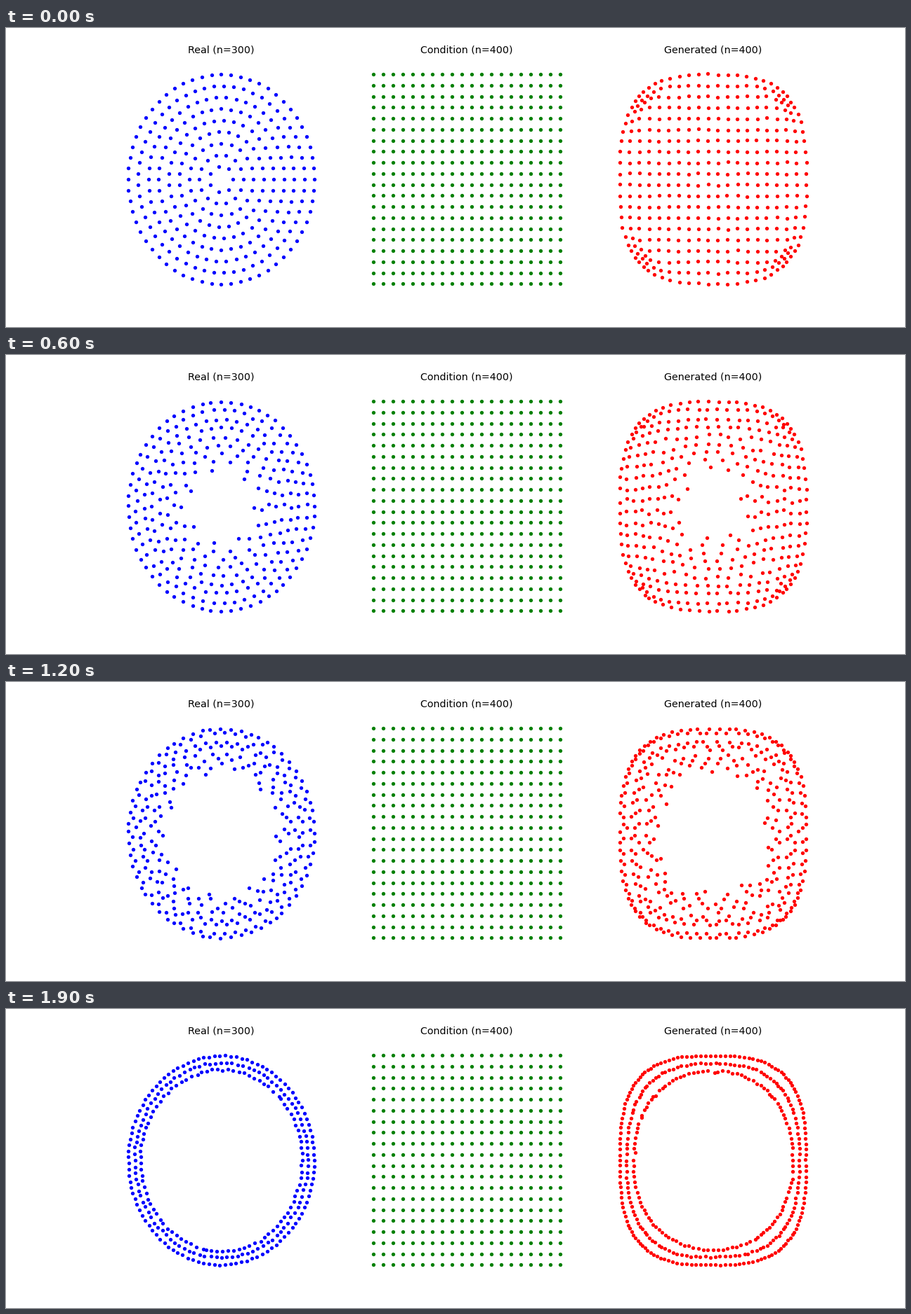
These frames come from a looping animation (1280 px wide and 427 px high, 2 s). A matplotlib script:

```python
import numpy as np
import matplotlib.pyplot as plt
from matplotlib.animation import FuncAnimation

W, H, DPI = 1280, 427, 64
FRAMES, STEP_MS = 20, 100
RADIUS = np.array([132.8, 149.6])
CENTERS = {"real": (306.4, 216), "cond": (656.2, 215.8), "gen": (1006.4, 216)}
CORNER_POWER = 2.95
rng = np.random.default_rng(4)


def edge(angle, power):
    """Polar radius of the unit superellipse."""
    c, s = np.abs(np.cos(angle)), np.abs(np.sin(angle))
    return (c ** power + s ** power) ** (-1 / power)


def ring(radius, count, power=2, crowd=0):
    """Evenly spread points on a ring, denser near the corners if crowded."""
    a = 2 * np.pi * np.arange(count) / count
    a = a + crowd / 4 * np.sin(4 * a)
    r = radius * edge(a, power)
    return np.column_stack([r * np.cos(a), -r * np.sin(a)])


def round_corners(points, core=0.9):
    """Squeeze the outer part of the square into a rounded shape."""
    a = np.arctan2(points[:, 1], points[:, 0])
    r = np.hypot(points[:, 0], points[:, 1])
    rim = edge(a, CORNER_POWER)
    square = 1 / np.maximum(np.abs(np.cos(a)), np.abs(np.sin(a)))
    inner = core * rim
    squeezed = inner + (r - inner) * (rim - inner) / (square - inner)
    r = np.where(r > inner, squeezed, r)
    return np.column_stack([r * np.cos(a), r * np.sin(a)])


def assign(cost):
    """Minimum-cost one-to-one assignment (Hungarian method)."""
    n = len(cost)
    u, v = np.zeros(n + 1), np.zeros(n + 1)
    owner, way = np.zeros(n + 1, int), np.zeros(n + 1, int)
    for row in range(1, n + 1):
        owner[0], j = row, 0
        best = np.full(n + 1, np.inf)
        used = np.zeros(n + 1, bool)
        while True:
            used[j] = True
            i = owner[j]
            reduced = cost[i - 1] - u[i] - v[1:]
            free = ~used[1:]
            better = free & (reduced < best[1:])
            best[1:][better] = reduced[better]
            way[1:][better] = j
            nxt = 1 + int(np.argmin(np.where(free, best[1:], np.inf)))
            delta = best[nxt]
            u[owner[used]] += delta
            v[used] -= delta
            best[~used] -= delta
            j = nxt
            if owner[j] == 0:
                break
        while j:
            prev = way[j]
            owner[j] = owner[prev]
            j = prev
    match = np.empty(n, int)
    match[owner[1:] - 1] = np.arange(n)
    return match


def squared_distance(a, b):
    return ((a[:, None] - b[None]) ** 2).sum(axis=2)


def pair(start, end, center, guides):
    """Match start to end points; guides pin the paths around the hole."""
    end = end.copy()
    guides = np.array(guides, float).reshape(-1, 2, 2)
    guides = (guides + 0.5 - center) / RADIUS
    pins = []
    for origin, goal in guides:
        i = np.argmin(((start - origin) ** 2).sum(axis=1))
        j = np.argmin(((end - goal) ** 2).sum(axis=1))
        end[j] = goal
        pins.append((i, j))
    cost = squared_distance(start, end)
    for i, j in pins:
        cost[i, j] -= 50
    return start * RADIUS + center, end[assign(cost)] * RADIUS + center


def jitter(points, amount):
    return points + rng.uniform(-amount, amount, points.shape)


# Disc of nine rings opening into three rings
disc_counts = (7, 14, 20, 27, 33, 40, 46, 53, 60)
disc = np.vstack([ring(r, n) for r, n in
                  zip(np.linspace(0.125, 1, 9), disc_counts)])
band = np.vstack([jitter(ring(0.865, 93), 0.008),
                  jitter(ring(0.93, 100), 0.008),
                  jitter(ring(0.997, 107), 0.004)])
real_guides = [
    (323, 216, 419, 222), (317, 201, 388, 124), (301, 198, 272, 93),
    (291, 208, 201, 162), (291, 224, 213, 291), (302, 235, 280, 342),
    (317, 230, 362, 331),
]
real_path = pair(disc, band, CENTERS["real"], real_guides)

# Square grid, and its rounded copy opening into a frame
axis = np.linspace(-1, 1, 20)
grid = np.array([(x, y) for y in axis for x in axis])
rounded = jitter(round_corners(grid), 0.007)
frame_band = np.vstack([
    jitter(ring(0.853, 116, 2.2, 0.15), 0.007),
    jitter(ring(0.925, 134, 2.6, 0.22), 0.007),
    jitter(ring(0.997, 150, CORNER_POWER, 0.25), 0.004),
])
gen_guides = [
    (1013, 208, 1119, 197), (999, 208, 904, 154), (999, 224, 992, 343),
    (1013, 224, 1066, 328), (1000, 192, 1008, 90), (1013, 192, 1056, 99),
    (985, 192, 924, 123), (985, 224, 900, 268), (985, 208, 895, 204),
    (1027, 224, 1119, 242), (1027, 192, 1093, 127),
]
gen_path = pair(rounded, frame_band, CENTERS["gen"], gen_guides)

fig = plt.figure(figsize=(W / DPI, H / DPI), dpi=DPI, facecolor="white")
ax = fig.add_axes([0, 0, 1, 1])
ax.set_xlim(0, W)
ax.set_ylim(H, 0)
ax.axis("off")


def dots(points, color):
    return ax.scatter(points[:, 0], points[:, 1], s=(5.3 * 72 / DPI) ** 2,
                      c=color, linewidths=0)


def title(key, text):
    ax.text(CENTERS[key][0], 35.2, text, fontsize=16, ha="center",
            va="baseline", family="DejaVu Sans", color="black")


title("real", "Real (n=300)")
title("cond", "Condition (n=400)")
title("gen", "Generated (n=400)")
real_dots = dots(real_path[0], "blue")
dots(grid * RADIUS + CENTERS["cond"], "green")
gen_dots = dots(gen_path[0], "red")


def update(i):
    t = i / (FRAMES - 1)
    for artist, (start, end) in ((real_dots, real_path), (gen_dots, gen_path)):
        artist.set_offsets(start + (end - start) * t)
    return real_dots, gen_dots


anim = FuncAnimation(fig, update, frames=FRAMES, interval=STEP_MS,
                     repeat=True, repeat_delay=0, blit=False)
plt.show()
```
